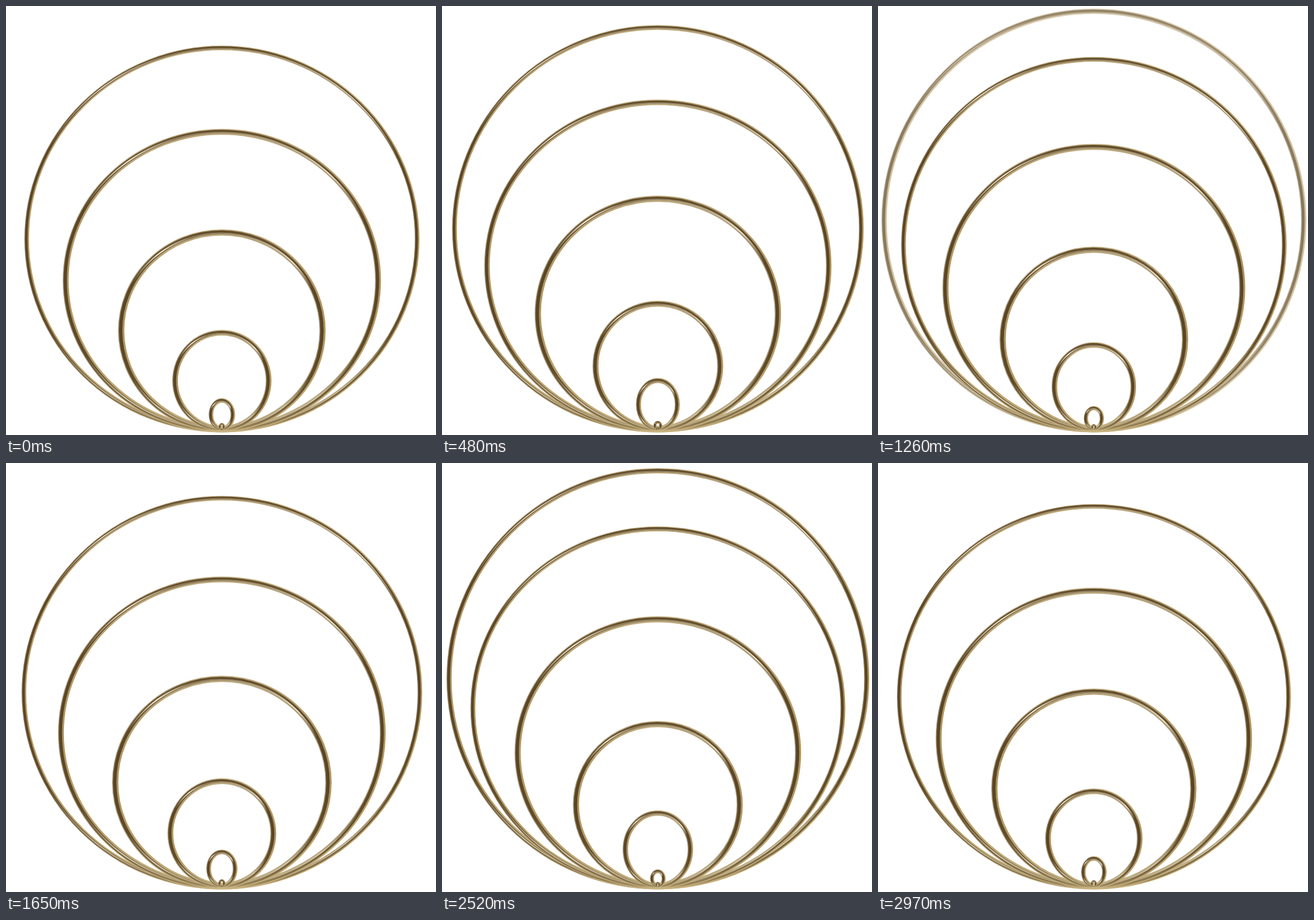
Recreate the animation shown at these times as an HTML page with a canvas. Size 750 by 747 pixels, loop 3000 ms.

```html
<!DOCTYPE html>
<html lang="en">
<head>
<meta charset="utf-8">
<title>Golden rings</title>
<style>
  html, body { margin: 0; width: 100%; height: 100%; overflow: hidden; background: #fff; }
  canvas { display: block; }
</style>
</head>
<body>
<canvas id="stage" width="750" height="747"></canvas>
<script>
const ctx = document.getElementById('stage').getContext('2d');
const STEP = 30;        // ms per picture
const PERIOD = 1500;    // ms until a ring takes the place of the next larger one
const CX = 376.5;

// Ring measures by age, sampled every half age from -1 to 6
const TOPS = [736, 731, 726, 717, 683, 626, 564, 482, 389, 298, 214, 136, 69, 18, 0];
const WIDTHS = [3, 7, 11, 20, 46, 98, 173, 261, 362, 466, 555, 631, 689, 730, 745];
// Wire thickness, sampled every whole age from -1 to 6
const WIRE = [2, 4, 7.8, 9.8, 10.8, 10.2, 8, 9.5];

// Catmull-Rom curve through evenly spaced values
function curve(values, x) {
  const last = values.length - 1;
  const i = Math.max(0, Math.min(last - 1, Math.floor(x)));
  const u = x - i;
  const b = values[i], c = values[i + 1];
  const a = i > 0 ? values[i - 1] : 2 * b - c;
  const d = i + 2 <= last ? values[i + 2] : 2 * c - b;
  return b + u / 2 * (c - a + u * (2 * a - 5 * b + 4 * c - d + u * (3 * (b - c) + d - a)));
}

// Stops run clockwise from the right: 0.25 bottom, 0.5 left, 0.75 top
function sweep(cx, cy, stops) {
  const g = ctx.createConicGradient(0, cx, cy);
  for (const [at, color] of stops) g.addColorStop(at, color);
  return g;
}

const BODY = [
  [0, '#a8946a'], [0.13, '#b9a577'], [0.25, '#c9b482'], [0.37, '#b9a577'],
  [0.5, '#a8946a'], [0.64, '#b6a27a'], [0.75, '#bba87c'], [0.87, '#b6a27a'], [1, '#a8946a']
];

const core = alpha => `rgba(86,64,30,${alpha})`;
const CORE = [
  [0, core(0.95)], [0.1, core(0.85)], [0.19, core(0.5)], [0.25, core(0.2)], [0.31, core(0.5)],
  [0.4, core(0.85)], [0.5, core(0.95)], [0.6, core(0.9)], [0.66, core(0.8)],
  [0.75, core(0.9)], [0.85, core(0.8)], [0.9, core(0.9)], [1, core(0.95)]
];

const shine = alpha => `rgba(255,248,224,${alpha})`;
const SHINE = [
  [0, shine(0)], [0.08, shine(0)], [0.14, shine(0.75)], [0.2, shine(0.35)], [0.3, shine(0.35)],
  [0.36, shine(0.75)], [0.42, shine(0)], [0.58, shine(0)], [0.645, shine(0.95)],
  [0.7, shine(0.3)], [0.76, shine(0.35)], [0.82, shine(0.5)], [0.88, shine(0.95)],
  [0.93, shine(0)], [1, shine(0)]
];

function stroke(cx, cy, rx, ry, width, stops) {
  ctx.beginPath();
  ctx.ellipse(cx, cy, Math.max(0.3, rx), Math.max(0.3, ry), 0, 0, Math.PI * 2);
  ctx.lineWidth = width;
  ctx.strokeStyle = sweep(cx, cy, stops);
  ctx.stroke();
}

function drawRing(age) {
  const top = curve(TOPS, (age + 1) * 2);
  const bottom = 739 + 3.5 * Math.max(0, Math.min(1, age / 4));
  const wire = curve(WIRE, age + 1);
  const cy = (top + bottom) / 2;
  const rx = (curve(WIDTHS, (age + 1) * 2) - wire) / 2;
  const ry = (bottom - top - wire) / 2;
  ctx.globalAlpha = Math.max(0, Math.min(1, (5.96 - age) / 0.2));
  stroke(CX, cy, rx, ry, wire, BODY);
  // The light falls from the left, so core and shine sit left of the middle
  stroke(CX - wire * 0.08, cy, rx, ry + wire * 0.06, wire * 0.54, CORE);
  stroke(CX - wire * 0.18, cy, rx, ry - wire * 0.1, wire * 0.2, SHINE);
}

function draw() {
  const time = Math.floor(performance.now() / STEP) * STEP;
  const phase = time % PERIOD / PERIOD;
  ctx.globalAlpha = 1;
  ctx.fillStyle = '#fff';
  ctx.fillRect(0, 0, 750, 747);
  for (let i = 5; i >= -1; i--) drawRing(i + phase);
  requestAnimationFrame(draw);
}
draw();
</script>
</body>
</html>
```
